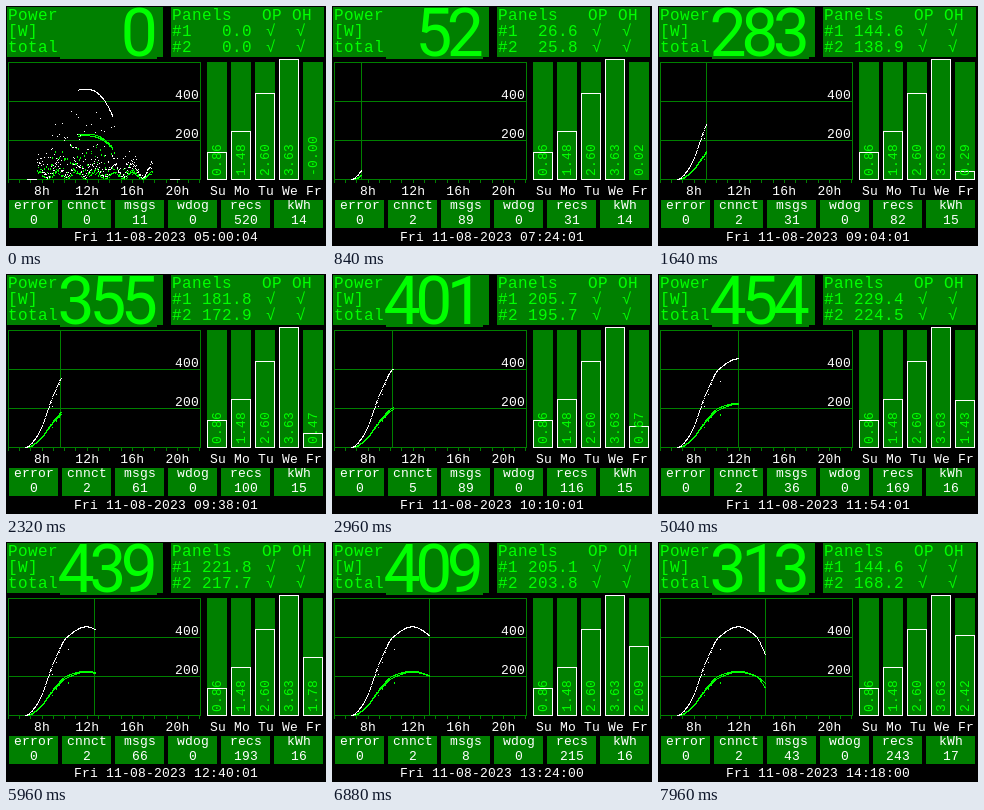
Animation, 320 px wide and 240 px high, one loop 8000 ms. Source, as an HTML page:

```html
<!DOCTYPE html>
<html lang="en">
<head>
<meta charset="utf-8">
<title>Solar power display</title>
<style>
html, body { margin: 0; width: 100%; height: 100%; overflow: hidden; background: #000; }
svg { display: block; width: 100%; height: 100%; }
text { white-space: pre; font-family: "Liberation Mono", monospace; }
.big { font-size: 16px; letter-spacing: .4px; fill: #0f0; }
.small { font-size: 13px; letter-spacing: .2px; fill: #fff; }
.green { fill: #0f0; }
.mid { text-anchor: middle; }
.watt { font: 66px Roboto, sans-serif; fill: #0f0; text-anchor: middle; }
rect, path { shape-rendering: crispEdges; }
.bar { fill: #008000; stroke: #fff; }
.line { fill: none; stroke: #008000; }
</style>
</head>
<body>
<svg id="stage" viewBox="0 0 320 240"></svg>
<script>
const STEP = 40, LOOP = 8000, BASE = 174;
const stage = document.getElementById('stage');

function add(tag, attrs, content = '') {
  const el = document.createElementNS('http://www.w3.org/2000/svg', tag);
  for (const name in attrs) el.setAttribute(name, attrs[name]);
  el.textContent = content;
  return stage.appendChild(el);
}
const label = (x, y, cls, content) => add('text', { x, y, class: cls }, content);
const box = (x, y, width, height) => add('rect', { x, y, width, height, fill: '#008000' });

const xAt = min => 2.3 + (min - 300) * .1879;
const yAt = watt => BASE - watt * .1975;
const noise = n => { const v = Math.sin(n * 12.9898) * 43758.5453; return v - Math.floor(v); };

// minute of day and power of both panels
const keys = [
  [380, 0, 0], [450, 30.5, 29.5], [544, 144.6, 138.9], [610, 205.7, 195.7],
  [714, 229.4, 224.5], [804, 205.1, 203.8], [858, 144.6, 168.2]
];

// monotone cubic through the key points
function power(m, col) {
  const last = keys.length - 1;
  if (m <= keys[0][0]) return 0;
  let i = 0;
  while (i < last - 1 && m > keys[i + 1][0]) i++;
  const slope = j => (keys[j + 1][col] - keys[j][col]) / (keys[j + 1][0] - keys[j][0]);
  const tangent = j => {
    if (j === 0) return 0;
    if (j === last) return slope(j - 1);
    const p = slope(j - 1), q = slope(j);
    return p * q <= 0 ? 0 : 2 * p * q / (p + q);
  };
  const h = keys[i + 1][0] - keys[i][0], u = (m - keys[i][0]) / h, v = 1 - u;
  return keys[i][col] * v * v * (1 + 2 * u) + keys[i + 1][col] * u * u * (3 - 2 * u)
    + h * u * v * (tangent(i) * v - tangent(i + 1) * u);
}

function energy(now) {
  let sum = 0;
  for (let m = 381; m < now; m += 2) sum += 2 * (power(m, 1) + power(m, 2));
  return sum * 1.006 / 60000;
}

// header
box(1, 1, 156, 50);
box(54, 4, 97, 49);
box(165, 1, 153, 50);
label(2, 14, 'big', 'Power');
const unit = label(2, 30, 'big');
label(2, 46, 'big', 'total');
const digits = [0, 1, 2].map(i => label(70 + i * 31.7, 50, 'watt'));
label(166, 14, 'big', 'Panels');
label(256, 14, 'big', 'OP');
label(286, 14, 'big', 'OH');
const panels = [30, 46].map((y, i) => {
  label(166, y, 'big', '#' + (i + 1));
  label(260, y, 'big', '√');
  label(290, y, 'big', '√');
  return label(196, y, 'big');
});

// chart
let ticks = '';
for (let h = 5; h <= 22; h++) ticks += `M${Math.floor(xAt(h * 60)) + .5} ${BASE}v3`;
add('path', { class: 'line', d: 'M2.5 56.5H194.5V173.5H2.5ZM2 95.5H194M2 134.5H194' + ticks });
const cursor = add('path', { class: 'line' });
const greenDots = add('path', { stroke: '#0f0' });
const whiteDots = add('path', { stroke: '#fff' });
label(169, 93, 'small', '400');
label(169, 132, 'small', '200');
[8, 12, 16, 20].forEach(h => label(xAt(h * 60), 189, 'small mid', h + 'h'));

// week
const weekBars = ['Su', 'Mo', 'Tu', 'We', 'Fr'].map((name, i) => {
  const x = 201 + i * 24;
  box(x, 56, 20, 118);
  label(x + 11, 189, 'small mid', name);
  const bar = add('rect', { class: 'bar', x: x + .5, width: 19 });
  const value = add('text', { class: 'small green', transform: `translate(${x + 14} 170) rotate(-90)` });
  return (kwh, shown = kwh.toFixed(2)) => {
    const h = Math.floor(kwh * 33.6);
    bar.setAttribute('y', BASE - h + .5);
    bar.setAttribute('height', Math.max(0, h - 1));
    value.textContent = shown;
  };
});
[.86, 1.48, 2.6, 3.63].forEach((kwh, i) => weekBars[i](kwh));

// counters
const counters = ['error', 'cnnct', 'msgs', 'wdog', 'recs', 'kWh'].map((name, i) => {
  const x = 3 + Math.round(i * 52.9);
  box(x, 194, 49, 28);
  label(x + 25, 203, 'small mid', name);
  return label(x + 25, 218, 'small mid');
});
const clock = label(68, 235, 'small');

const dot = (x, watt) => `M${Math.round(x)} ${Math.min(173, Math.round(yAt(watt))) + .5}h1`;

function plot(from, to, sample) {
  let white = '', green = '';
  for (let m = from; m <= to; m += 2) {
    const x = xAt(m);
    for (const [a, b] of sample(m)) {
      white += dot(x, a + b);
      green += dot(x, a) + dot(x, b);
    }
  }
  whiteDots.setAttribute('d', white);
  greenDots.setAttribute('d', green);
}

// a cloudy day that clears up around noon
function yesterday(m) {
  const split = watt => [watt * .505, watt * .485];
  const sky = 466 * Math.exp(-((Math.abs(m - 707) / 216) ** 2.7));
  const wave = Math.sin(m * .031) ** 2;
  const light = m > 450 && m < 1065 ? 1 : 0;
  const cloudy = light * (12 + 75 * wave * (.6 + .6 * noise(m)) + sky * .7 * noise(m + 1) ** 4);
  const list = [];
  if (light || m < 450 || m > 1160) list.push(split(cloudy || 4 * noise(m)));
  if (m > 670 && m < 856) list.push(split(sky));
  return list;
}

// mostly clear, with a few passing shadows in the morning
function today(m) {
  const dip = noise(m) < .07 && m < 670 ? .82 + .14 * noise(m + 1) : 1;
  return [[power(m, 1) * dip, power(m, 2) * dip]];
}

function minuteAt(step) {
  if (step === 0) return 300;
  if (step < 41) return 342 + 2 * Math.round((step - 1) * 2.525);
  return 544 + 2 * (step - 41) - (step > 150 ? 2 : 0);
}

// messages since the last restart
function messages(m) {
  const restart = [342, 508, 659, 792].filter(r => r <= m).pop();
  return Math.round((m - restart) * (m < 659 ? .87 : .65));
}

function render(step) {
  const m = minuteAt(step), night = step === 0;
  const offline = !night && step % 16 === 0;
  const idle = night || offline;
  const p = [1, 2].map(col => idle ? 0 : power(m, col));
  const kwh = idle ? 0 : energy(m);

  unit.textContent = offline ? '[]' : '[W]';
  const watts = String(Math.max(0, Math.round(p[0] + p[1] - .1))).padStart(3);
  digits.forEach((el, i) => el.textContent = watts[i]);
  panels.forEach((el, i) => el.textContent = p[i].toFixed(1).padStart(5));

  if (night) plot(400, 1210, yesterday); else plot(390, m, today);
  cursor.setAttribute('d', `M${Math.floor(xAt(m)) + .5} 56V174`);
  weekBars[4](kwh, (night ? '-' : '') + kwh.toFixed(2));

  const stats = [
    0,
    idle ? 0 : m >= 580 && m < 659 ? 5 : 2,
    night ? 11 : offline ? 0 : messages(m),
    0,
    night ? 520 : Math.max(0, Math.round(82.45 + (m - 544) * .5115)),
    offline ? 0 : Math.floor(14.8 + kwh)
  ];
  counters.forEach((el, i) => el.textContent = stats[i]);

  const sec = night ? 4 : step < 150 && !offline ? 1 : 0;
  const time = [Math.floor(m / 60), m % 60, sec].map(n => String(n).padStart(2, '0')).join(':');
  clock.textContent = 'Fri 11-08-2023 ' + time;
}

let shown = -1;
const start = performance.now();
function tick() {
  const step = Math.floor((performance.now() - start) % LOOP / STEP);
  if (step !== shown) render(shown = step);
  requestAnimationFrame(tick);
}
tick();
</script>
</body>
</html>
```
